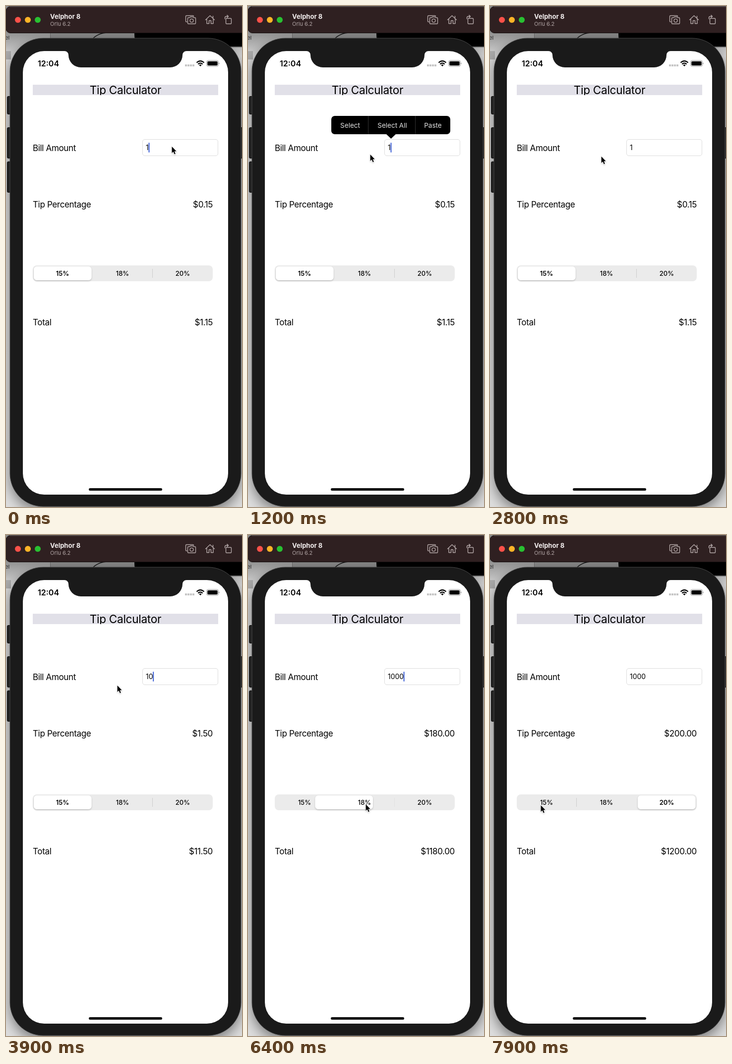
Recreate the animation shown at these times as an HTML page. Size 476 by 1012 pixels, loop 8000 ms.

```html
<!DOCTYPE html>
<html lang="en">
<head>
<meta charset="utf-8">
<title>Tip Calculator</title>
<style>
  html, body { margin: 0; width: 100%; height: 100%; overflow: hidden; background: #ddd; }
  svg { display: block; width: 476px; height: 1012px; font-family: Inter, Roboto, sans-serif; }
  .label { font-size: 17px; letter-spacing: -.35px; }
  .end { text-anchor: end; }
  .mid { text-anchor: middle; }
  .seg { font-size: 13px; font-weight: 500; text-anchor: middle; }
  .icon { fill: none; stroke: #b5a9a9; stroke-width: 1.4; stroke-linejoin: round; stroke-linecap: round; }
</style>
</head>
<body>
<svg viewBox="0 0 476 1012">
  <defs>
    <linearGradient id="wall" x2="0" y2="1">
      <stop offset=".05" stop-color="#8c8c8c"/>
      <stop offset=".1" stop-color="#d6d6d6"/>
      <stop offset="1" stop-color="#dedede"/>
    </linearGradient>
    <filter id="soft" x="-30%" y="-30%" width="160%" height="180%">
      <feDropShadow dx="0" dy="1.5" stdDeviation="1.5" flood-opacity=".22"/>
    </filter>
    <filter id="deep" x="-20%" y="-10%" width="140%" height="120%">
      <feDropShadow dx="0" dy="10" stdDeviation="13" flood-opacity=".45"/>
    </filter>
    <clipPath id="titleClip"><rect x="54" y="159" width="374" height="21"/></clipPath>
  </defs>

  <!-- desktop behind the phone -->
  <rect width="476" height="1012" fill="url(#wall)"/>
  <rect x="89" y="54" width="387" height="30" fill="#858585"/>
  <path d="M89.5 54V84" stroke="#666"/>
  <path d="M174 67Q186 54 206 54" fill="none" stroke="#111" stroke-width="1.5"/>
  <path d="M259 50V58Q259 82 283 82H476V50z"/>
  <rect y="91" width="10" height="17" fill="#aaa"/>
  <text x="-2" y="68" font-size="11" fill="#222">el</text>

  <!-- phone -->
  <rect x="8" y="65" width="466" height="946" rx="67" fill="#1a1a1a" filter="url(#deep)"/>
  <g fill="#222" stroke="#050505">
    <rect x="2.5" y="182.5" width="9" height="36" rx="2"/>
    <rect x="2.5" y="245.5" width="9" height="62" rx="2"/>
    <rect x="2.5" y="314.5" width="9" height="62" rx="2"/>
    <rect x="470" y="245.5" width="9" height="62" rx="2"/>
  </g>
  <rect x="8" y="65" width="466" height="946" rx="67" fill="#1a1a1a" stroke="#484848"/>
  <rect x="34" y="91" width="414" height="896" rx="43" fill="#fff"/>
  <path d="M118 90V91A8 8 0 0 1 126 99A25 25 0 0 0 151 124H331A25 25 0 0 0 356 99A8 8 0 0 1 364 91V90z" fill="#1a1a1a"/>
  <rect x="167" y="974" width="148" height="5" rx="2.5"/>

  <!-- title bar -->
  <rect y="1" width="490" height="53.5" rx="9" fill="#2f2021" stroke="#120c0c"/>
  <path d="M8 1.5H476" stroke="#665a5a" stroke-width=".8"/>
  <circle cx="24" cy="28" r="6" fill="#fd5149"/>
  <circle cx="44" cy="28" r="6" fill="#fdb427"/>
  <circle cx="64" cy="28" r="6" fill="#28c131"/>
  <text x="89" y="26" font-size="13" font-weight="700" fill="#f4efef">Velphor 8</text>
  <text x="89" y="40" font-size="11" fill="#b1a5a5">Orlu 6.2</text>
  <g class="icon">
    <path d="M365 32H364Q362.5 32 362.5 30.5V21Q362.5 19.5 364 19.5H377Q378.5 19.5 378.5 21"/>
    <path d="M368 23.5H370.5L372 22H377L378.5 23.5H381Q382.5 23.5 382.5 25V34.5Q382.5 36 381 36H368Q366.5 36 366.5 34.5V25Q366.5 23.5 368 23.5z"/>
    <circle cx="374.5" cy="29.5" r="3.4"/>
    <path d="M402.5 28L411.5 19.5 420.5 28M405 26.5V35.5H409.5V29.5H413.5V35.5H418V26.5M417.5 24.5V20.5"/>
    <rect x="443.5" y="25" width="11" height="11" rx="1.5"/>
    <path d="M441.5 26V24Q441.5 21 444.5 21H448M446 18.5L448.5 21 446 23.5"/>
  </g>

  <!-- status bar -->
  <text x="64" y="122" font-size="16" font-weight="600">12:04</text>
  <path d="M361 120H380" stroke="#c6c6c6" stroke-width="4" stroke-dasharray="4 1"/>
  <path d="M384.5 114.5Q392 107.5 399.5 114.5M387.3 117.5Q392 113.3 396.7 117.5" fill="none" stroke="#000" stroke-width="2.2"/>
  <path d="M389.3 119.3Q392 117 394.7 119.3L392 122z"/>
  <rect x="404.5" y="110" width="24" height="12" rx="3.5" fill="none" stroke="#999"/>
  <rect x="406.2" y="111.7" width="20.6" height="8.6" rx="2"/>
  <path d="M429.5 114Q431.5 116 429.5 118z" fill="#777"/>

  <!-- form -->
  <rect x="54" y="159" width="374" height="21" fill="#e1e0e8"/>
  <g clip-path="url(#titleClip)">
    <text class="mid" x="241" y="178" font-size="22.5" letter-spacing="-.25">Tip Calculator</text>
  </g>
  <g class="label">
    <text x="54" y="293">Bill Amount</text>
    <text x="54" y="407">Tip Percentage</text>
    <text x="54" y="645">Total</text>
    <text class="end" id="tip" x="417" y="407"></text>
    <text class="end" id="total" x="417" y="645"></text>
  </g>
  <rect x="275.5" y="269.5" width="152" height="33" rx="4.5" fill="#fff" stroke="#dcdcdc"/>
  <text id="bill" x="282" y="291" font-size="14"></text>
  <rect id="caret" y="276" width="2" height="20" rx="1" fill="#3c5fd6"/>

  <rect x="54" y="524" width="363" height="32" rx="8" fill="#ebebeb"/>
  <path id="sep1" d="M174.5 531V549" stroke="#cdcdcd"/>
  <path id="sep2" d="M295.5 531V549" stroke="#cdcdcd"/>
  <rect id="pill" y="526" width="116.5" height="28" rx="6.5" fill="#fff" filter="url(#soft)"/>
  <text class="seg" x="114" y="545">15%</text>
  <text class="seg" x="235" y="545">18%</text>
  <text class="seg" x="356.5" y="545">20%</text>

  <g id="menu">
    <path d="M175 222H401A7 7 0 0 1 408 229V252A7 7 0 0 1 401 259H298L288.5 268 279 259H175A7 7 0 0 1 168 252V229A7 7 0 0 1 175 222z"/>
    <path d="M242.5 222V259M337.5 222V259" stroke="#333"/>
    <g class="mid" font-size="13.5" fill="#e2e2e2">
      <text x="206" y="245.5">Select</text>
      <text x="291" y="245.5">Select All</text>
      <text x="373" y="245.5">Paste</text>
    </g>
  </g>

  <g id="cursor">
    <path d="M.6 1V14L3.6 11.300 5.800 16.400 7.800 15.500 5.700 10.600H9.700z"
      stroke="#fff" stroke-width="1.2" paint-order="stroke" filter="url(#soft)"/>
  </g>
</svg>
<script>
const $ = id => document.getElementById(id);
const segs = document.querySelectorAll('.seg');
const clamp = v => Math.max(0, Math.min(1, v));

// time, x, y of the pointer tip
const path = [
  [0, 334, 283], [100, 337, 284], [400, 290, 291], [800, 290, 291], [1400, 224, 303],
  [4600, 224, 303], [5200, 273, 487], [5500, 262, 566], [6000, 237, 543], [6500, 237, 543],
  [7000, 380, 545], [7300, 380, 545], [7800, 102, 545], [8000, 102, 545]
];
const bills = [[0, '1'], [3200, '10'], [4000, '100'], [4100, '1000']];
const rates = [[0, 15], [6300, 18], [7300, 20]];
const blinks = [2100, 2700, 4700, 5700, 6700, 7700];

const latest = (list, t) => list.filter(k => k[0] <= t).pop()[1];

function pointer(t) {
  const i = path.findIndex(k => k[0] > t);
  const [t0, x0, y0] = path[i - 1], [t1, x1, y1] = path[i];
  const p = (t - t0) / (t1 - t0);
  return `translate(${x0 + (x1 - x0) * p} ${y0 + (y1 - y0) * p})`;
}

const slide = (t, start) => 1 - (1 - clamp((t - start) / 350)) ** 3;

function draw(t) {
  const bill = latest(bills, t), rate = latest(rates, t);
  const tip = bill * rate / 100;
  $('bill').textContent = bill;
  $('tip').textContent = '$' + tip.toFixed(2);
  $('total').textContent = '$' + (+bill + tip).toFixed(2);

  const atFront = t >= 1400 && t < 2400;
  $('caret').setAttribute('x', atFront ? 282 : 287.5 + (bill.length - 1) * 8.7);
  $('caret').setAttribute('opacity', Math.min(...blinks.map(b =>
    t < b || t >= b + 400 ? 1 : Math.max(1 - (t - b + 100) / 200, (t - b - 200) / 100))));

  const pos = slide(t, 6295) + slide(t, 7295);
  $('pill').setAttribute('x', 56 + 121 * pos);
  $('sep1').setAttribute('opacity', clamp(pos - 1));
  $('sep2').setAttribute('opacity', clamp(1 - pos));
  segs.forEach((s, i) => s.style.fontWeight = Math.abs(pos - i) < .01 ? 600 : 500);

  $('menu').setAttribute('opacity', clamp(Math.min((t - 500) / 200, (1400 - t) / 200)));
  $('cursor').setAttribute('transform', pointer(t));
}

// the screen refreshes ten times a second
function tick() {
  draw(Math.floor((performance.now() + 8) / 100) * 100 % 8000);
  requestAnimationFrame(tick);
}
tick();
</script>
</body>
</html>
```
